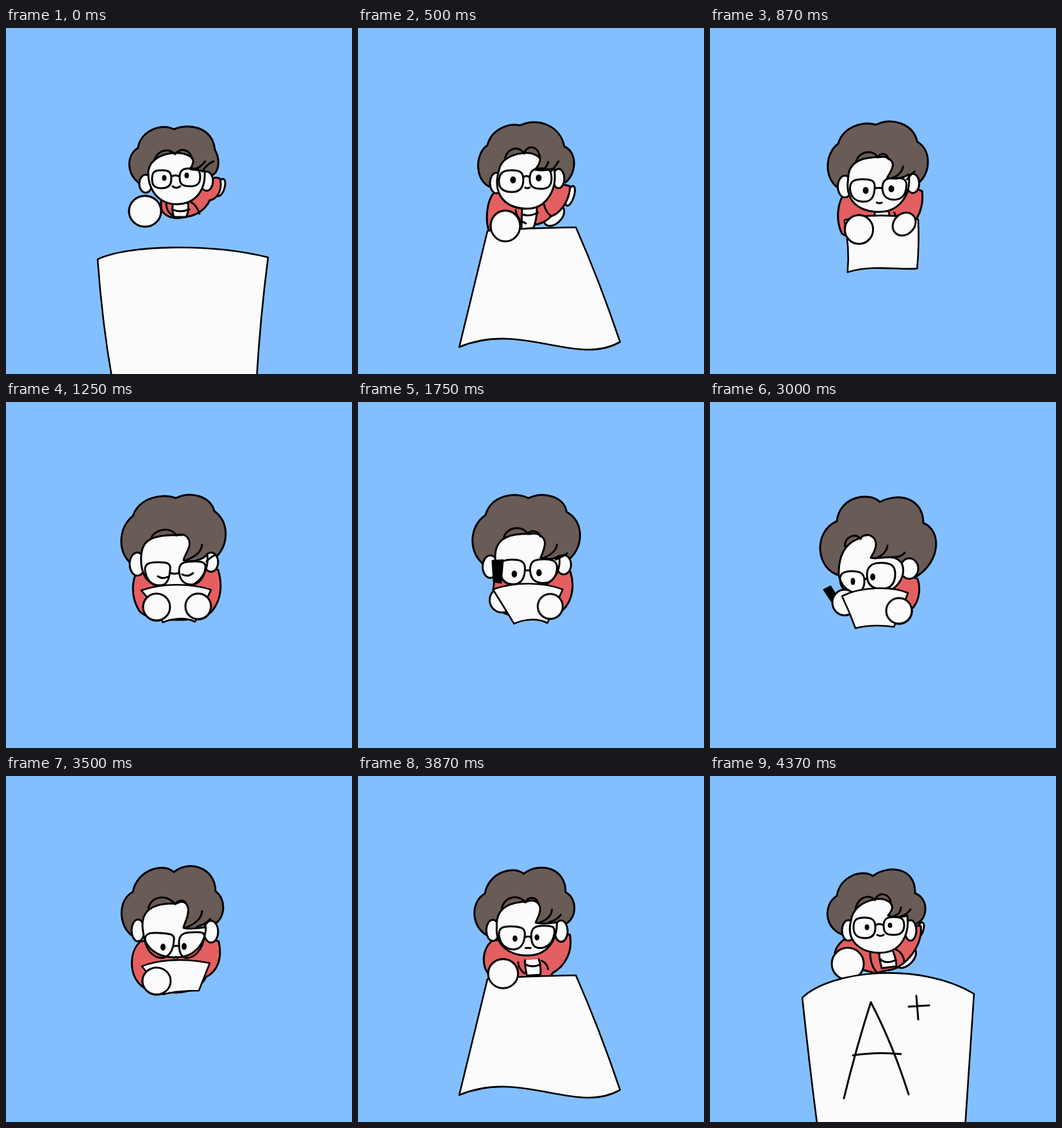
Write an HTML page without scripts that moves like this. It is 540 px wide and 540 px high and loops after 5000 ms.

```html
<!DOCTYPE html>
<html lang="en">
<head>
<meta charset="utf-8">
<title>Top marks</title>
<style>
html, body { margin: 0; width: 100%; height: 100%; overflow: hidden; background: #83bfff; }
svg { display: block; width: 100%; height: 100%; }
path, ellipse { stroke: #000; stroke-width: 3; stroke-linecap: round; stroke-linejoin: round; fill: #fbfbfb; }
.line { fill: none; }
.ink { fill: #000; }

/* Drawn at eight pictures a second: poses blend in steps of 125 ms */
.move, .cut { animation: 5s steps(4) -6ms infinite; }
.cut { animation-timing-function: step-end; }
.tilt { transform-box: fill-box; transform-origin: center; }

#hair { fill: #695b56; animation-name: hair; }
#face { animation-name: face; }
#strands { animation-name: strands; }
#body { fill: #e45f61; animation-name: body; }
#shirt { animation-name: shirt; }
#lapels { animation-name: lapels; }
#lenses { animation-name: lenses; }
#mouth { animation-name: mouth; }
#sheet { stroke-width: 2.6; animation-name: sheet; }
#pen { animation-name: pen; }
#earL { animation-name: earL; }
#earR { animation-name: earR; }
#eyeL { animation-name: eyeL; }
#eyeR { animation-name: eyeR; }
#cuff { animation-name: cuff; rotate: 18deg; }
.handL { animation-name: handL; }
.handR { animation-name: handR; rotate: -45deg; }
#grade { animation-name: grade; transform-origin: 270px 310px; }
#open { animation-name: open; }
#lids { animation-name: lids; }
#penShow { animation-name: penShow; }
#frontL { animation-name: frontL; }
#frontR { animation-name: frontR; }

@keyframes hair {
  0% { d: path("M209 243C188 228 187 199 206 187C210 160 243 148 262 158C285 148 322 154 326 190C335 206 333 228 318 231"); }
  10% { d: path("M206 248C182 238 182 196 202 183C208 158 235 148 253 152C280 139 316 152 322 185C341 192 343 225 324 241"); animation-timing-function: steps(6); }
  25% { d: path("M195 252C173 232 176 195 198 178C208 149 243 142 265 150C290 138 319 148 325 170C349 188 348 222 327 243"); animation-timing-function: steps(8); }
  45% { d: path("M199 256C171 240 169 193 200 175C207 143 246 136 267 150C291 139 325 148 326 173C356 183 358 228 333 247"); animation-timing-function: steps(6); }
  60% { d: path("M203 271C164 261 161 202 198 186C202 146 250 140 265 156C299 139 333 153 333 189C360 199 362 246 323 272"); }
  70% { d: path("M198 250C174 234 175 192 198 181C204 147 245 134 262 150C286 130 327 143 327 180C345 192 342 225 323 232"); animation-timing-function: steps(7); }
  87.5%, 100% { d: path("M208 248C178 238 176 201 198 187C203 156 237 145 254 156C279 138 321 142 320 183C342 191 340 223 323 230"); }
}
@keyframes face {
  0% { d: path("M222 224C224 206 242 196 264 195C278 194 294 201 292 209C291 215 289 218 287 220C294 222 302 221 310 224C312 250 298 275 266 275C238 275 221 252 222 224Z"); }
  10% { d: path("M220 222C222 207 238 196 262 195C274 194 286 202 284 207C283 213 279 218 276 221C287 224 298 221 306 219C312 252 294 282 264 282C230 282 209 260 220 222Z"); animation-timing-function: steps(6); }
  25% { d: path("M211 250C209 222 218 206 268 208C283 203 288 217 286 225C284 234 279 238 277 247C290 249 305 248 314 238C318 270 295 292 265 292C236 292 212 282 211 250Z"); animation-timing-function: steps(8); }
  45% { d: path("M218 248C214 222 228 202 268 204C285 201 298 211 297 220C297 228 297 233 293 239C301 243 308 243 314 242C318 275 298 290 266 290C234 290 222 275 218 248Z"); animation-timing-function: steps(6); }
  60% { d: path("M201 270C200 236 213 219 235 212C247 202 259 211 259 222C259 231 254 237 251 243C265 247 285 235 298 250C308 265 297 296 262 300C225 303 206 295 201 270Z"); }
  70% { d: path("M214 243C209 216 221 198 266 199C279 191 286 202 284 214C283 224 278 230 277 237C288 240 300 237 312 236C311 263 292 284 265 283C236 284 216 268 214 243Z"); animation-timing-function: steps(7); }
  87.5%, 100% { d: path("M220 226C222 208 238 195 260 192C274 190 286 198 284 207C283 213 279 215 278 218C289 221 300 220 308 218C312 250 296 276 265 276C233 276 212 256 220 226Z"); }
}
@keyframes strands {
  0% { d: path("M231 207C238 188 255 188 264 197C271 187 286 187 291 205M311 208Q302 220 290 221M324 208Q314 212 306 224"); }
  10% { d: path("M229 206C232 186 252 183 259 196C263 182 281 182 284 202M297 209Q294 220 285 222M313 208Q308 216 302 223"); animation-timing-function: steps(6); }
  25% { d: path("M226 214C230 199 255 193 266 208C268 206 271 207 273 208M306 223Q304 238 283 246M326 239Q318 243 313 249"); animation-timing-function: steps(8); }
  45% { d: path("M229 212C228 195 255 186 264 204C268 192 293 193 296 212M315 222Q315 232 296 241M327 233Q322 239 304 243"); animation-timing-function: steps(6); }
  60% { d: path("M211 226C208 212 227 202 235 214C237 208 241 208 244 208M277 224Q275 238 258 244M304 235Q298 243 284 242"); }
  70% { d: path("M222 206C228 187 250 184 264 200C268 193 276 193 280 197M306 211Q305 227 280 237M319 223Q313 231 298 235"); animation-timing-function: steps(7); }
  87.5%, 100% { d: path("M227 208C231 187 251 184 257 194C261 181 279 181 282 197M298 205Q298 215 288 218M313 208Q308 216 298 219"); }
}
@keyframes lenses {
  0% { d: path("M228 236C228 225 231 222 243 222C255 222 258 225 258 236C258 246 252 250 243 250C232 250 228 246 228 236ZM271 233C271 222 276 219 288 219C300 219 303 222 303 233C303 244 297 247 288 247C275 247 271 244 271 233ZM258 232Q264 228 271 232"); }
  10% { d: path("M220 238C221 226 226 222 240 222C254 222 258 226 258 237C258 251 251 256 240 256C227 256 219 250 220 238ZM268 236C268 223 273 219 286 219C299 219 302 223 302 235C302 247 296 251 286 251C273 251 268 247 268 236ZM258 233Q263 229 268 233"); animation-timing-function: steps(6); }
  25% { d: path("M217 263C216 252 224 250 237 250C252 250 258 252 256 262C255 277 251 287 239 286C226 286 219 276 217 263ZM270 264C270 252 276 249 291 249C307 248 313 251 311 260C309 275 301 284 290 285C276 285 271 276 270 264ZM257 267Q263 269 270 267"); animation-timing-function: steps(8); }
  45% { d: path("M225 262C223 247 229 242 244 242C260 242 265 249 265 261C265 276 258 282 245 283C231 283 226 275 225 262ZM267 260C267 246 273 242 288 242C304 242 310 248 310 260C310 273 303 280 290 280C274 281 267 273 267 260ZM265 258Q266 257 267 258"); animation-timing-function: steps(6); }
  60% { d: path("M203 278C202 268 209 264 221 264C235 264 241 268 241 279C241 292 236 297 223 297C210 297 204 290 203 278ZM245 270C245 256 253 251 267 251C283 251 289 256 289 268C289 283 283 291 269 292C252 292 245 284 245 270ZM241 277Q243 275 245 277"); }
  70% { d: path("M217 257C216 246 224 244 239 245C257 246 264 247 262 257C261 273 254 283 243 284C228 283 219 270 217 257ZM270 260C270 247 278 244 290 244C306 243 312 244 309 254C306 270 296 283 283 284C272 284 270 273 270 260ZM262 266Q266 264 270 266"); animation-timing-function: steps(7); }
  87.5%, 100% { d: path("M224 236C224 225 228 221 241 221C254 221 258 225 258 237C258 248 252 253 242 253C229 253 224 247 224 236ZM271 234C271 224 275 220 287 220C300 220 303 224 303 233C303 244 297 248 287 248C275 248 271 245 271 234ZM258 233Q264 229 271 233"); }
}
@keyframes mouth {
  0% { d: path("M260 247Q266 252 272 247"); }
  10% { d: path("M261 249Q264 251 268 249"); animation-timing-function: steps(6); }
  25%, 60% { d: path("M260 296Q264 298 268 296"); }
  70% { d: path("M262 284Q265 281 268 284"); animation-timing-function: steps(7); }
  87.5%, 100% { d: path("M261 248Q266 251 271 248"); }
}
@keyframes body {
  0% { d: path("M243 262C241 270 242 278 243 285C252 298 268 298 280 295C303 292 313 279 318 269C332 266 338 250 334 235C326 231 320 235 310 245Z"); }
  10% { d: path("M213 256C200 270 199 300 204 316C220 322 240 312 256 304C275 312 292 304 301 294C314 290 330 272 331 247C322 244 310 242 300 240Z"); animation-timing-function: steps(6); }
  25% { d: path("M212 255C197 268 192 300 208 326C220 340 250 340 266 340C285 340 310 340 322 326C336 308 338 285 331 262C325 258 310 254 300 250Z"); animation-timing-function: steps(8); }
  45% { d: path("M225 275C222 290 225 310 230 320C240 330 255 330 266 330C285 330 305 332 318 323C335 310 338 285 332 268C325 262 317 258 310 255Z"); animation-timing-function: steps(6); }
  60% { d: path("M225 290C225 300 225 310 230 320C240 330 255 330 266 330C285 330 305 332 316 322C327 310 329 290 324 276C316 272 306 270 298 268Z"); }
  70% { d: path("M210 258C191 275 192 312 212 328C222 338 250 338 266 338C285 338 305 330 312 314C330 305 338 285 332 258C322 255 310 252 300 250Z"); animation-timing-function: steps(7); }
  87.5%, 100% { d: path("M208 256C196 266 193 276 195 286C215 300 235 300 258 308C275 302 285 304 294 298C316 284 332 258 329 234C321 233 314 234 305 235Z"); }
}
@keyframes shirt {
  0% { d: path("M261 272Q258 285 262 295L281 295Q286 286 284 272"); }
  10% { d: path("M256 280Q256 293 255 314L274 312Q280 295 279 280"); animation-timing-function: steps(6); }
  25%, 70% { d: path("M258 296Q258 305 260 320L280 320Q282 305 280 296"); animation-timing-function: steps(7); }
  87.5%, 100% { d: path("M264 276Q264 285 268 300L291 297Q291 286 285 272"); }
}
@keyframes lapels {
  0% { d: path("M259 283Q272 289 286 283M250 275Q251 288 262 294M288 271Q298 277 302 290"); }
  10% { d: path("M257 291Q268 295 281 288M246 284Q248 299 262 305M290 274Q293 288 301 293"); animation-timing-function: steps(6); }
  25%, 70% { d: path("M258 300Q268 304 280 300M250 302Q250 305 260 310M285 302Q290 305 292 310"); animation-timing-function: steps(7); }
  87.5%, 100% { d: path("M265 285Q274 295 290 287M250 276Q250 294 259 305M289 270Q302 276 303 290"); }
}
@keyframes sheet {
  0% { d: path("M143 361C190 338 320 336 409 358Q397 450 391 550C330 550 230 550 166 550Q150 460 143 361Z"); animation-timing-function: steps(2); }
  5%, 82.5% { d: path("M180 335C220 325 310 323 355 332Q410 430 458 550C350 550 200 550 81 550Q130 430 180 335Z"); animation-timing-function: steps(2); }
  10%, 77.5% { d: path("M202 317C210 314 300 312 340 311Q377 395 409 490C340 529 255 457 158 498Q181 404 202 317Z"); animation-timing-function: steps(2); }
  12.5%, 75% { d: path("M207 312C230 306 300 306 335 311Q360 380 380 440C330 465 250 430 154 455Q185 390 207 312Z"); animation-timing-function: steps(3); }
  20%, 25% { d: path("M211 294C245 282 290 283 320 293Q310 315 295 343C280 335 258 338 245 344Q235 320 211 294Z"); animation-timing-function: steps(8); }
  45% { d: path("M210 291C245 278 290 279 319 292Q309 315 296 347C280 338 258 340 242 348Q224 325 210 291Z"); animation-timing-function: steps(6); }
  60% { d: path("M206 303C235 288 285 287 309 298Q300 322 287 351C270 348 245 348 227 353Q218 328 206 303Z"); }
  70% { d: path("M212 297C240 285 285 285 318 292Q309 315 301 335C283 335 262 336 245 341Q232 320 212 297Z"); animation-timing-function: steps(2); }
  87.5%, 100% { d: path("M144 346C190 302 330 290 412 340Q405 440 398 550C330 550 230 550 168 550Q155 450 144 346Z"); }
}
@keyframes pen {
  0%, 45% { d: path("M210 248L226 247L223 282L212 280Z"); animation-timing-function: steps(6); }
  60%, 100% { d: path("M178 293L188 288L198 304L190 311Z"); }
}
@keyframes earL {
  0% { cx: 218px; cy: 243px; rx: 10px; ry: 14px; }
  10% { cx: 216px; cy: 242px; rx: 10px; ry: 16px; animation-timing-function: steps(6); }
  25% { cx: 205px; cy: 253px; rx: 12px; ry: 18px; animation-timing-function: steps(8); }
  45% { cx: 208px; cy: 261px; rx: 12px; ry: 17px; animation-timing-function: steps(6); }
  60% { cx: 218px; cy: 264px; rx: 8px; ry: 10px; }
  70% { cx: 206px; cy: 241px; rx: 10px; ry: 17px; animation-timing-function: steps(7); }
  87.5%, 100% { cx: 216px; cy: 241px; rx: 10px; ry: 16px; }
}
@keyframes earR {
  0% { cx: 313px; cy: 239px; rx: 10px; ry: 15px; }
  10% { cx: 313px; cy: 235px; rx: 9px; ry: 15px; animation-timing-function: steps(6); }
  25% { cx: 320px; cy: 250px; rx: 11px; ry: 15px; animation-timing-function: steps(8); }
  45% { cx: 322px; cy: 258px; rx: 12px; ry: 15px; animation-timing-function: steps(6); }
  60% { cx: 311px; cy: 260px; rx: 14px; ry: 16px; }
  70% { cx: 320px; cy: 243px; rx: 11px; ry: 17px; animation-timing-function: steps(7); }
  87.5%, 100% { cx: 313px; cy: 241px; rx: 9px; ry: 16px; }
}
@keyframes eyeL {
  0% { cx: 247px; cy: 234px; rx: 2px; ry: 3px; }
  10% { cx: 242px; cy: 237px; rx: 3px; ry: 4px; animation-timing-function: steps(6); }
  25% { cx: 244px; cy: 270px; rx: 3px; ry: 4px; animation-timing-function: steps(8); }
  45% { cx: 244px; cy: 267px; rx: 2.5px; ry: 4px; animation-timing-function: steps(6); }
  60% { cx: 223px; cy: 280px; rx: 2px; ry: 4px; }
  70% { cx: 245px; cy: 267px; rx: 2.5px; ry: 4px; animation-timing-function: steps(7); }
  87.5%, 100% { cx: 245px; cy: 236px; rx: 2px; ry: 3px; }
}
@keyframes eyeR {
  0% { cx: 282px; cy: 230px; rx: 2px; ry: 3px; }
  10% { cx: 282px; cy: 234px; rx: 3px; ry: 4px; animation-timing-function: steps(6); }
  25% { cx: 284px; cy: 268px; rx: 3px; ry: 4px; animation-timing-function: steps(8); }
  45% { cx: 281px; cy: 265px; rx: 2.5px; ry: 4px; animation-timing-function: steps(6); }
  60% { cx: 254px; cy: 273px; rx: 2.5px; ry: 4px; }
  70% { cx: 278px; cy: 266px; rx: 2.5px; ry: 4px; animation-timing-function: steps(7); }
  87.5%, 100% { cx: 281px; cy: 233px; rx: 2px; ry: 2.5px; }
}
@keyframes cuff {
  0% { cx: 335px; cy: 249px; rx: 6px; ry: 14px; }
  10% { cx: 331px; cy: 262px; rx: 6px; ry: 16px; animation-timing-function: steps(6); }
  25%, 70% { cx: 310px; cy: 290px; rx: 5px; ry: 12px; animation-timing-function: steps(7); }
  87.5%, 100% { cx: 328px; cy: 240px; rx: 5px; ry: 12px; }
}
@keyframes handL {
  0% { cx: 217px; cy: 286px; rx: 25px; ry: 24px; }
  10% { cx: 230px; cy: 309px; rx: 23px; ry: 24px; animation-timing-function: steps(6); }
  25% { cx: 235px; cy: 320px; rx: 21px; ry: 21px; animation-timing-function: steps(8); }
  45% { cx: 214px; cy: 298px; rx: 17px; ry: 18px; animation-timing-function: steps(6); }
  60% { cx: 210px; cy: 313px; rx: 19px; ry: 20px; }
  70% { cx: 235px; cy: 320px; rx: 22px; ry: 21px; animation-timing-function: steps(7); }
  87.5%, 100% { cx: 215px; cy: 293px; rx: 25px; ry: 25px; }
}
@keyframes handR {
  0% { cx: 295px; cy: 270px; rx: 10px; ry: 8px; }
  10% { cx: 306px; cy: 293px; rx: 19px; ry: 12px; animation-timing-function: steps(6); }
  25% { cx: 300px; cy: 319px; rx: 20px; ry: 20px; animation-timing-function: steps(8); }
  45% { cx: 300px; cy: 319px; rx: 19px; ry: 19px; animation-timing-function: steps(6); }
  60% { cx: 295px; cy: 326px; rx: 20px; ry: 20px; }
  70% { cx: 285px; cy: 310px; rx: 13px; ry: 13px; animation-timing-function: steps(7); }
  87.5%, 100% { cx: 306px; cy: 284px; rx: 19px; ry: 11px; }
}
@keyframes grade {
  0% { opacity: 0; }
  82.5% { opacity: 1; transform: scale(.9); }
  85% { opacity: 1; transform: scale(.95); }
  87.5%, 100% { opacity: 1; transform: none; }
}
@keyframes open { 0%, 30%, 100% { opacity: 1; } 22.5% { opacity: 0; } }
@keyframes lids { 0%, 30%, 100% { opacity: 0; } 22.5% { opacity: 1; } }
@keyframes penShow { 0%, 65%, 100% { opacity: 0; } 35% { opacity: 1; } }
@keyframes frontL { 0%, 65% { opacity: 1; } 32.5%, 82.5%, 100% { opacity: 0; } }
@keyframes frontR { 0%, 67.5%, 100% { opacity: 0; } 17.5% { opacity: 1; } }
</style>
</head>
<body>
<svg viewBox="0 0 540 540">
  <ellipse id="cuff" class="move tilt"/>
  <ellipse class="move tilt handR"/>
  <path id="body" class="move"/>
  <path id="shirt" class="move"/>
  <path id="lapels" class="move line"/>

  <path id="hair" class="move"/>
  <ellipse id="earL" class="move"/>
  <ellipse id="earR" class="move"/>
  <path id="face" class="move"/>
  <path id="strands" class="move line"/>
  <path id="lenses" class="move line"/>
  <g id="open" class="cut">
    <ellipse id="eyeL" class="move ink"/>
    <ellipse id="eyeR" class="move ink"/>
  </g>
  <path id="lids" class="cut line" d="M237 272Q244 277 252 273M275 269Q284 274 292 267"/>
  <path id="mouth" class="move line"/>

  <g id="penShow" class="cut"><path id="pen" class="move ink"/></g>
  <ellipse class="move handL"/>
  <path id="sheet" class="move"/>
  <path id="grade" class="cut line" d="M209 503L210 499Q228 425 251 353Q285 418 310 497M223 436Q260 430 298 434M310 360L342 358M322 343L325 380"/>
  <g id="frontL" class="cut"><ellipse class="move handL"/></g>
  <g id="frontR" class="cut"><ellipse class="move tilt handR"/></g>
</svg>
</body>
</html>
```
